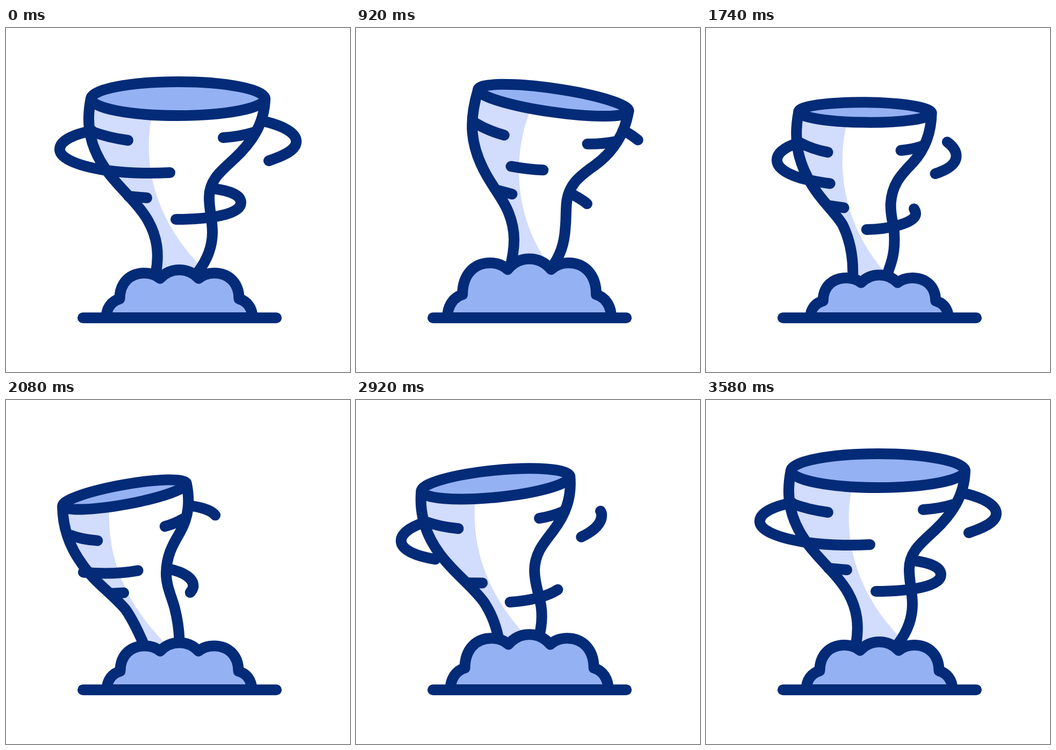
An HTML page that plays this animation: 640 px wide and 640 px high, repeating every 3600 ms.

```html
<!DOCTYPE html>
<html lang="en">
<head>
<meta charset="utf-8">
<title>Tornado</title>
<style>
html, body { margin: 0; width: 100%; height: 100%; overflow: hidden; background: #fff; }
svg { display: block; width: 100vw; height: 100vh; }
.line { fill: none; stroke: #032b77; stroke-width: 20; stroke-linecap: round; stroke-linejoin: round; }
.line.mid { fill: #94b1f3; }
.pale { fill: #d2dcfd; }
</style>
</head>
<body>
<svg id="stage" viewBox="0 0 640 640"></svg>
<script>
const LOOP = 3600;
const stage = document.getElementById('stage');

function add(cls) {
  const el = document.createElementNS('http://www.w3.org/2000/svg', 'path');
  el.setAttribute('class', cls);
  stage.appendChild(el);
  return el;
}
const lerp = (a, b, k) => a + (b - a) * k;
const mix = (p, q, k) => p.map((v, i) => lerp(v, q[i], k));
const ease = k => 0.5 - 0.5 * Math.cos(Math.PI * k);
const seg = (t, from, to) => ease(Math.min(1, Math.max(0, (t - from) / (to - from))));

// Eased value through [time, value] keys
function track(t, keys) {
  let v = keys[0][1];
  for (let i = 1; i < keys.length; i++) {
    if (t > keys[i - 1][0]) v = lerp(keys[i - 1][1], keys[i][1], seg(t, keys[i - 1][0], keys[i][0]));
  }
  return v;
}

// Three poses (upright, right, left) sharing one path structure
function morph(upright, right, left) {
  const nums = s => s.match(/-?[\d.]+/g).map(Number);
  const up = nums(upright);
  const l = mix(up, nums(left), 1.025);
  const r = mix(l, nums(right), 1.035);
  const poses = [up, r, l, up];
  return sway => {
    const i = Math.min(2, Math.floor(sway));
    const v = mix(poses[i], poses[i + 1], sway - i);
    let n = 0;
    return upright.replace(/-?[\d.]+/g, () => v[n++].toFixed(2));
  };
}

const leftSide = [
  'M158,131 C148,180 156,222 187,265 C210,297 245,325 264,358 C282,390 285,420 279,455 L275,475',
  'M243,113 C225,170 222,218 258,282 C272,308 280,320 287,340 C300,375 298,405 287,448 L281,470',
  'M83,210 C86,243 98,276 122,307 C147,343 187,368 213,398 C227,416 243,445 256,466 L262,480'
];
const rightSide = [
  'M482,131 C481,180 455,215 425,243 C400,266 378,283 378,315 C378,340 384,355 384,380 C384,405 375,430 358,453 L344,472',
  'M508,161 C500,200 480,235 445,259 C415,279 396,295 392,330 C390,350 390,355 388,370 C386,400 380,422 360,450 L346,470',
  'M310,153 C319,185 320,213 305,245 C293,270 284,290 284,320 C284,345 296,367 303,390 C309,408 313,425 317,445 L321,465'
];
const shadeEdge = [
  ' L366,447 C262,343 258,230 271,165',
  ' L367,455 C290,355 302,225 334,155',
  ' L310,475 C203,385 171,290 170,212'
];

const shapes = [
  ['pale', leftSide.map((s, i) => s + shadeEdge[i])],
  ['line', leftSide],
  ['line', rightSide],
  ['line', ['M158,192 Q190,204 227,209', 'M237,175 Q258,190 286,199', 'M98,262 Q122,270 152,271']],
  ['line', ['M404,204 Q435,202 461,194', 'M433,220 Q460,221 482,217', 'M275,237 Q292,231 305,222']],
  ['line', ['M228,313 L262,316', 'M268,300 L296,309', 'M183,369 L207,366']]
].map(([cls, poses]) => ({ el: add(cls), at: morph(...poses) }));

const rings = [
  ['M160,191 C130,197 100,208 100,226 C100,244 140,258 187,265 C225,270 270,271 305,269',
   'M238,170 C210,175 183,185 183,202 C183,222 225,240 268,248 C300,257 328,263 357,265',
   'M92,266 C76,276 67,288 67,300 C67,318 90,328 120,331 C155,334 195,332 228,325'],
  ['M489,247 C518,237 540,227 540,211 C540,195 515,182 482,174',
   'M492,277 C520,273 543,268 543,254 C543,230 513,207 498,197',
   'M346,263 C360,252 370,235 370,217 C370,203 345,198 318,196'],
  ['M316,356 C380,356 437,347 437,325 C437,310 415,303 388,299',
   'M333,357 C372,361 434,362 434,345 C434,332 408,319 398,310',
   'M256,397 C293,391 333,366 336,347 C337,330 318,320 290,315']
].map(poses => {
  const el = add('line');
  el.setAttribute('pathLength', 1);
  return { el, at: morph(...poses) };
});

const rim = add('line mid');
// Centre, half axis vector and half height of the rim
const rimAt = morph('320,131.5 162,0 31.5', '375.5,137 132.5,24.5 19', '196.5,181.5 113,-28 18.5');

const dust = add('line mid');
const ground = add('line');
ground.setAttribute('d', 'M143,539.2 H503');

function drawRim(sway) {
  const [cx, cy, ax, ay, r] = rimAt(sway).split(/[ ,]/).map(Number);
  const half = Math.hypot(ax, ay);
  const turn = Math.atan2(ay, ax) * 180 / Math.PI;
  const arc = (x, y) => `A${half},${r} ${turn} 0 1 ${x},${y}`;
  rim.setAttribute('d', `M${cx - ax},${cy - ay}${arc(cx + ax, cy + ay)}${arc(cx - ax, cy - ay)}Z`);
}

// Half of the cloud as offsets from the middle of the ground line
const puff = [[-136, 0], [-136, -18], [-126, -31], [-111, -35],
  [-111, -65], [-92, -83], [-65, -83], [-54, -83], [-44, -80], [-36, -73],
  [-26, -84], [-14, -89], [0, -89]];
const cloud = puff.concat(puff.slice(0, -1).reverse().map(([x, y]) => [-x, y]));

function drawDust(k) {
  const sx = 1 + 0.118 * k, sy = 1 + 0.224 * k;
  const pts = cloud.map(([x, y]) => `${(322.5 + x * sx).toFixed(2)},${(539 + y * sy).toFixed(2)}`);
  dust.setAttribute('d', `M${pts[0]}C${pts.slice(1).join(' ')}Z`);
}

// Visible part of each ring: out, in and out, then in again
function trim(t) {
  if (t < 1250) return [seg(t, 345, 1185), 1];
  if (t < 2360) return [seg(t, 1770, 2360), seg(t, 1310, 1985)];
  return [0, seg(t, 2360, 3440)];
}

function draw(t) {
  const sway = track(t, [[400, 0], [1170, 1], [2380, 2], [3430, 3]]);
  for (const s of shapes) s.el.setAttribute('d', s.at(sway));
  drawRim(sway);

  const [from, to] = trim(t);
  for (const { el, at } of rings) {
    el.style.display = to - from > 0.004 ? '' : 'none';
    el.setAttribute('d', at(sway));
    el.setAttribute('stroke-dasharray', to - from > 0.9999 ? 'none' : `${to - from} 3`);
    el.setAttribute('stroke-dashoffset', -from);
  }
  drawDust(track(t, [[200, 0], [1000, 1.05], [1800, -0.5], [2600, 1.05], [3400, 0]]));
}

const begin = performance.now();
function tick() {
  draw((performance.now() - begin) % LOOP);
  requestAnimationFrame(tick);
}
tick();
</script>
</body>
</html>
```
